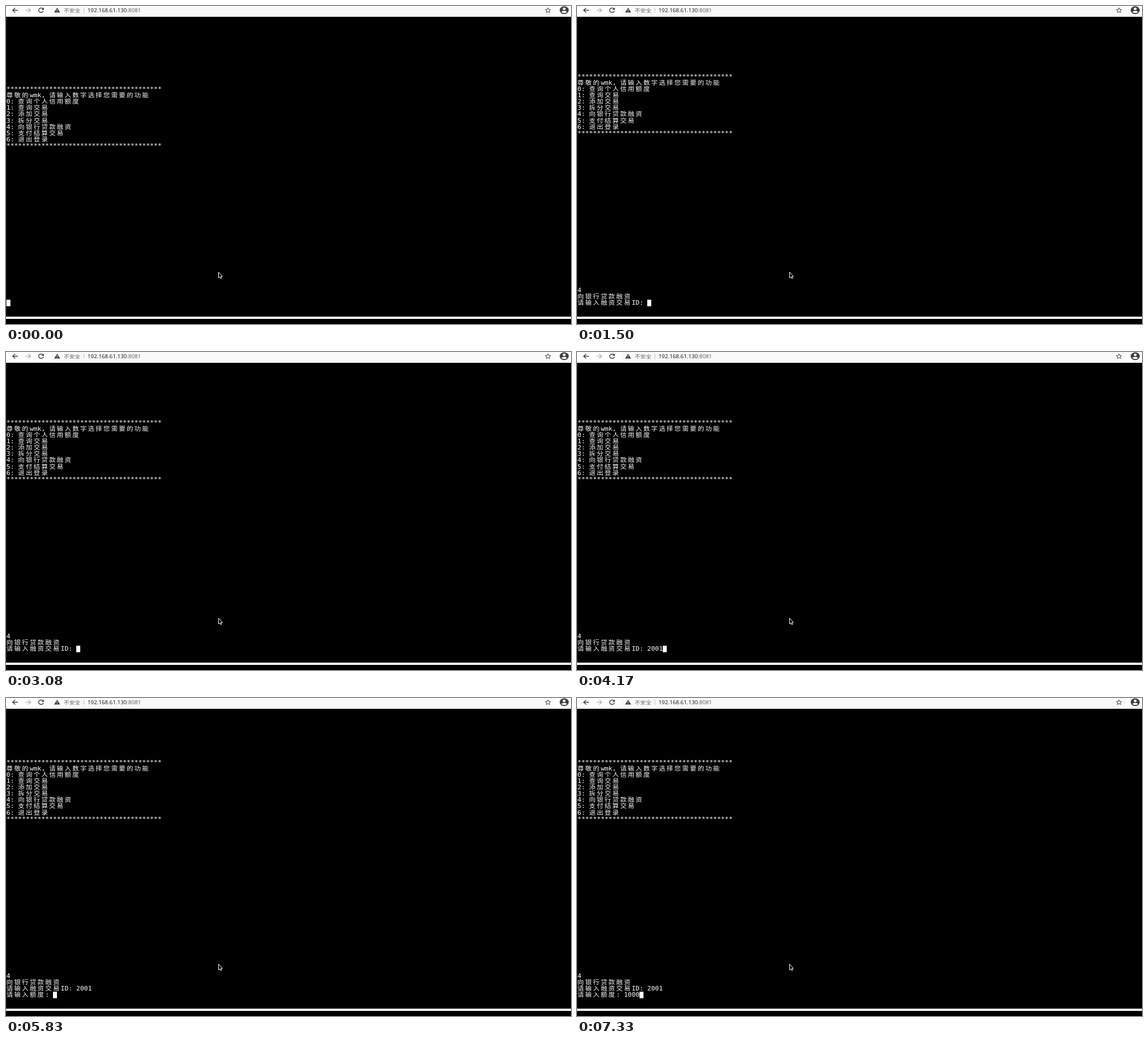
Animation of 998x561 px, one loop 8 s. Source, as an HTML page:

```html
<!DOCTYPE html>
<html lang="zh-CN">
<head>
<meta charset="utf-8">
<title>Terminal</title>
<style>
  html, body { margin: 0; width: 100%; height: 100%; overflow: hidden; background: #000; }
  svg { display: block; width: 998px; height: 561px; }
  #screen { font: 11.4px "DejaVu Sans Mono", "Noto Sans CJK SC", "Noto Sans CJK", monospace; fill: #fff; }
  #bar text { font: 9.8px "Noto Sans", "Open Sans", "Noto Sans CJK SC", "Noto Sans CJK", sans-serif; fill: #202124; }
  #bar .muted { fill: #5f6368; }
  .line { fill: none; stroke: #3c4043; stroke-width: 1.4; }
</style>
</head>
<body>
<svg viewBox="0 0 998 561">
  <rect width="998" height="561"/>
  <rect y="19" width="1" height="529" fill="#21182a"/>
  <rect y="548" width="998" height="4" fill="#fff"/>

  <g id="bar">
    <rect width="998" height="19" fill="#fff"/>
    <rect x="78" y="-6" width="892" height="23" rx="11" fill="#f8f9fa"/>
    <path class="line" d="M21 7.5H12M16.3 3.5L11.8 7.5L16.3 11.5"/>
    <path class="line" style="stroke:#b4b7ba" d="M34.500 7.500H43.500M39.200 3.500L43.700 7.500L39.200 11.500"/>
    <path class="line" d="M65.600 5A4.400 3.900 0 1 0 66.300 8.500"/>
    <path d="M67 2.700V6.800H62.300Z" fill="#3c4043"/>
    <path d="M90.300 3L95.600 11.500H85Z" fill="#3c4043"/>
    <path d="M90.300 5.800V8.500M90.300 9.300V10.400" stroke="#fff"/>
    <text class="muted" transform="translate(102 10.900) scale(1 .86)">不安全</text>
    <path d="M137.500 3V12" stroke="#bdc1c6"/>
    <text transform="translate(144 10.500) scale(1 .86)">192.168.61.130<tspan class="muted">:8081</tspan></text>
    <path class="line" style="stroke-width:1" d="M957.300 3L958.700 6.200L962 6.400L959.500 8.400L960.300 11.500L957.300 9.800L954.300 11.500L955.100 8.400L952.600 6.400L955.900 6.200Z"/>
    <ellipse cx="986" cy="7.300" rx="8" ry="6.900" fill="#3c4043"/>
    <ellipse cx="986" cy="5" rx="2.600" ry="2.200" fill="#fff"/>
    <path d="M980.800 10.500Q986 6.400 991.200 10.500Q986 14.200 980.800 10.500Z" fill="#fff"/>
  </g>

  <g id="screen"></g>
  <rect id="caret" y="518.200" width="7" height="11.400" fill="#fff"/>
  <path d="M375.500 469.500V479.800L377.900 477.900L379.300 480.900L380.900 480.200L379.500 477.200H382.300Z" fill="#000" stroke="#fff"/>
</svg>

<script>
const LOOP = 8000;
const CELL = 6.85, ROW = 11.1, LEFT = 0.8, BASELINE = 527.4;
const SQUASH = 0.86; // the terminal is shown flattened
const RULE = "*".repeat(40);
const START = [
  RULE,
  "尊敬的wmk, 请输入数字选择您需要的功能",
  "0: 查询个人信用额度",
  "1: 查询交易",
  "2: 添加交易",
  "3: 拆分交易",
  "4: 向银行贷款融资",
  "5: 支付结算交易",
  "6: 退出登录",
  RULE
].join("\n") + "\n".repeat(25);

const OUTPUT = [
  [830, "4"],
  [1500, "\n向银行贷款融资\n请输入融资交易ID: "],
  [3500, "2"], [3670, "0"], [3830, "0"], [4000, "1"],
  [5750, "\n请输入额度: "],
  [6500, "1"], [6670, "0"], [6830, "0"], [7000, "0"]
];

const screen = document.getElementById("screen");
const caret = document.getElementById("caret");
let shown = null;

// Wide characters take two cells.
function layout(line) {
  let x = LEFT;
  const xs = [...line].map(c => {
    const at = x;
    x += c > "\u2e80" ? 2 * CELL : CELL;
    return at.toFixed(2);
  });
  return { xs, end: x };
}

function addLine(line, rowsUp) {
  const text = document.createElementNS("http://www.w3.org/2000/svg", "text");
  text.setAttribute("transform", `translate(0 ${BASELINE - rowsUp * ROW}) scale(1 ${SQUASH})`);
  text.setAttribute("x", layout(line).xs.join(" "));
  text.textContent = line;
  screen.append(text);
}

function render(time) {
  const content = START + OUTPUT.filter(([at]) => time >= at).map(([, s]) => s).join("");
  if (content === shown) return;
  shown = content;
  const lines = content.split("\n");
  screen.replaceChildren();
  lines.forEach((line, i) => line && addLine(line, lines.length - 1 - i));
  caret.setAttribute("x", layout(lines.at(-1)).end);
}

const begin = performance.now();
function tick() {
  render((performance.now() - begin) % LOOP);
  requestAnimationFrame(tick);
}
tick();
</script>
</body>
</html>
```
